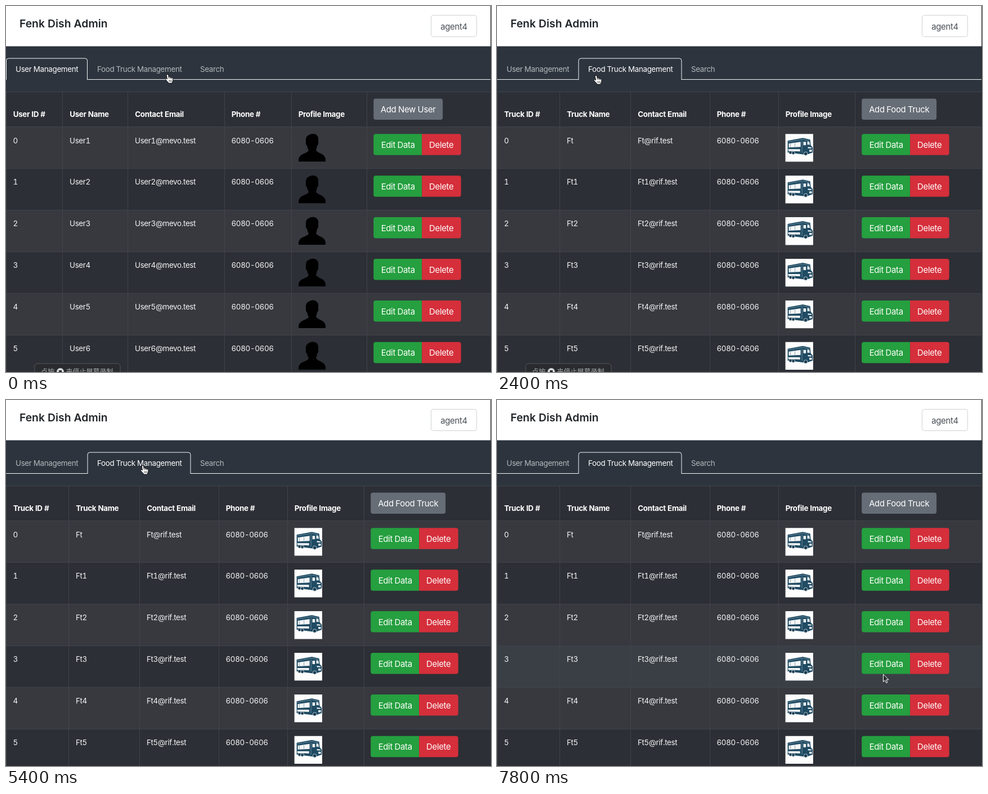
Animation of 862x650 px, one loop 8 s. Source, as an HTML page:

```html
<!DOCTYPE html>
<html lang="en">
<head>
<meta charset="utf-8">
<title>Admin tables</title>
<style>
  html, body { margin: 0; width: 100%; height: 100%; overflow: hidden; background: #2d343e; }
  svg { display: block; width: 100vw; height: 100vh; }
  text {
    font: 400 13.4px Inter, "Open Sans", sans-serif;
    font-variant-numeric: tabular-nums;
    letter-spacing: -.025em;
    fill: #f4f5f6;
  }
  .title { font-size: 19.3px; font-weight: 600; letter-spacing: 0; fill: #212529; }
  .head { font-weight: 700; fill: #fff; }
  .button { font-size: 15px; text-anchor: middle; fill: #fff; }
  .account { fill: #4a5056; }
  .toast { font: 12px "Noto Sans CJK SC", "Noto Sans CJK", sans-serif; letter-spacing: 0; fill: #a9abad; }
</style>
</head>
<body>
<svg id="stage" viewBox="0 0 862 650" preserveAspectRatio="none">
  <defs>
    <path id="person" d="M0 49V45Q1 38 9 35Q17 32 18 29Q16 26 15 21Q12 18 13 14Q12 4 18 2Q24-2 31 1Q36 4 35 13Q36 18 33 21Q32 26 31 29Q33 32 40 35Q47 38 48 45V49Z"/>
    <g id="truck">
      <path fill="#fdfdfd" d="M0 0H49.3V49.3H0Z"/>
      <path fill="#1f4b63" d="M4 12L31 7L44 10L45 20L48.5 24V33L37 37L4 33Z"/>
      <path fill="#f4f7f8" d="M6 17L27 14V23L6 24ZM5 27H26V31L5 30ZM32 14H36.5V20H32ZM39 13L42.5 14L43.5 19H39ZM40 23L46.5 24V25.5H40ZM42.5 28H47V31.5H42.5Z"/>
      <path fill="none" stroke="#7f9baa" stroke-width=".8" d="M5 14L31 9.5L43 12M29.5 12V33M9 17V23.5M17 16V23"/>
      <g fill="#163a50" stroke="#e6edf0" stroke-width=".8">
        <circle cx="9" cy="33" r="2.8"/><circle cx="14" cy="33.6" r="2.8"/><circle cx="36" cy="35" r="3.2"/>
      </g>
    </g>
  </defs>

  <path fill="#2d343e" d="M0 0H862V650H0Z"/>
  <path fill="#fff" d="M0 0H861V71.5H0Z"/>
  <text class="title" x="24" y="38">Fenk Dish Admin</text>
  <rect x="755.5" y="16.5" width="81" height="38" rx="4" fill="#fff" stroke="#cfd2d6"/>
  <text class="button account" x="796" y="41.5">agent4</text>

  <g id="tabs"></g>
  <g id="views"></g>

  <g id="toast">
    <rect x="51" y="635" width="152" height="40" rx="5" fill="#292b2f" stroke="#54575c"/>
    <text class="toast" x="62" y="654">点按</text>
    <circle cx="96.5" cy="649.5" r="6.5" fill="#d6d7d8"/>
    <path fill="#292b2f" d="M94 647H99V652H94Z"/>
    <text class="toast" x="106.5" y="654">来停止屏幕录制</text>
  </g>

  <g id="cursor" stroke="#111" stroke-linejoin="round">
    <g id="hand">
      <path fill="#fff" d="M-1.6 1.2Q-1.6-.7 0-.7Q1.5-.7 1.7 1.2L2.3 5Q4-.1 4.8 5Q6.5 4 7.2 5.9Q9.6 4.8 9.9 7.8Q10.2 11 8.4 13.3V15H1.2V13.5Q-1 11.5-3.3 8.6Q-4.2 6.9-2.8 6.5Q-1.8 6.3-.5 8Z"/>
      <path fill="none" stroke-width=".8" d="M2.4 4.5V7M4.8 5V7.2M7.2 5.9V7.6M3 9.5V12.5M5 9.5V12.5M7 9.5V12.5"/>
    </g>
    <path id="arrow" fill="#2a2d31" stroke="#fff" d="M.5.5V14L3.6 11.2L5.8 16L8 15L5.9 10.3H10Z"/>
  </g>
  <path fill="#2b2e33" d="M861 0H862V650H861Z"/>
</svg>

<script>
const LOOP = 8000, STEP = 200;
const ROWS = 6, ROW_TOP = 215, ROW_HEIGHT = 73.9;
const DARK = '#2c2f35', STRIPE = '#37393f', HOVER = '#3a3f45', LINE = '#40444b';
const $ = id => document.getElementById(id);

function add(parent, tag, attrs, content) {
  const node = document.createElementNS('http://www.w3.org/2000/svg', tag);
  for (const name in attrs) node.setAttribute(name, attrs[name]);
  if (content !== undefined) node.textContent = content;
  parent.appendChild(node);
  return node;
}
const show = (node, on) => node.setAttribute('display', on ? 'inline' : 'none');
const label = (parent, x, y, content, kind = '') =>
  add(parent, 'text', { x, y, class: kind }, content);
const path = (parent, d, fill, stroke = 'none') => add(parent, 'path', { d, fill, stroke });

// Tabs
const tabs = [
  { name: 'User Management', left: .5, right: 144.5, textX: 17 },
  { name: 'Food Truck Management', left: 145, right: 328, textX: 162 },
  { name: 'Search', left: 329, right: 404, textX: 345 }
];
path($('tabs'), 'M0 130.5H861', 'none', '#f5f6f7');
for (const tab of tabs) {
  const { left, right } = tab;
  const outline = `M${left} 131V97Q${left} 93 ${left + 4} 93H${right - 4}Q${right} 93 ${right} 97V131`;
  tab.gap = path($('tabs'), `M${left} 129H${right}V132H${left}Z`, '#2d343e');
  tab.border = path($('tabs'), outline, 'none', '#f5f6f7');
  tab.text = label($('tabs'), tab.textX, 117, tab.name);
}

// Tables
function makeView({ edges, heads, addLabel, addWidth, cells, image, imageX }) {
  const group = add($('views'), 'g', {});
  const actionX = edges[5] + 12.2;
  const rowY = i => ROW_TOP + i * ROW_HEIGHT;
  add(group, 'rect', { x: 0, y: 152, width: 861, height: 498, fill: DARK });
  const rows = Array.from({ length: ROWS }, (_, i) => add(group, 'rect', {
    x: 0, y: rowY(i), width: 861, height: ROW_HEIGHT
  }));
  let grid = 'M0 152.5H861M0 214.5H861';
  for (let i = 1; i < ROWS; i++) grid += `M0 ${Math.round(rowY(i)) - .5}H861`;
  for (const x of edges) grid += `M${Math.floor(x) + .5} 152V650`;
  path(group, grid, 'none', LINE);

  heads.forEach((head, i) => label(group, edges[i] + 12.7, 197, head, 'head'));
  add(group, 'rect', { x: actionX, y: 164.5, width: addWidth, height: 37.5, rx: 4, fill: '#666d76' });
  label(group, actionX + addWidth / 2, 189.3, addLabel, 'button');

  for (let i = 0; i < ROWS; i++) {
    const y = rowY(i);
    cells(i).forEach((cell, col) => label(group, edges[col] + 12.5, y + 28.5, cell));
    add(group, 'use', { href: image, x: imageX, y: y + 12.3 });
    const buttons = add(group, 'g', { transform: `translate(${actionX} ${y + 12.3})` });
    path(buttons, 'M4 0H86V37.5H4Q0 37.5 0 33.5V4Q0 0 4 0Z', '#259f3f');
    path(buttons, 'M86 0H151.5Q155.5 0 155.5 4V33.5Q155.5 37.5 151.5 37.5H86Z', '#d52f3b');
    label(buttons, 43.5, 24.7, 'Edit Data', 'button');
    label(buttons, 120.5, 24.7, 'Delete', 'button');
  }
  return { group, rows };
}

const phone = '6080-0606';
const shared = ['Contact Email', 'Phone #', 'Profile Image'];
const views = [
  makeView({
    edges: [0, 100.5, 216.5, 388, 507, 641],
    heads: ['User ID #', 'User Name', ...shared],
    addLabel: 'Add New User', addWidth: 123,
    cells: i => [i, `User${i + 1}`, `User${i + 1}@mevo.test`, phone],
    image: '#person', imageX: 520
  }),
  makeView({
    edges: [0, 111.5, 237.5, 378, 500, 636],
    heads: ['Truck ID #', 'Truck Name', ...shared],
    addLabel: 'Add Food Truck', addWidth: 133,
    cells: i => [i, `Ft${i || ''}`, `Ft${i || ''}@rif.test`, phone],
    image: '#truck', imageX: 512.6
  })
];

// Pointer path: time, x, y
const pointerKeys = [
  [0, 287, 122], [800, 251, 118], [1400, 250, 117], [2400, 176, 124],
  [3000, 93, 119], [3800, 90, 119], [4600, 233, 115], [5200, 243, 117],
  [5800, 243, 117], [6400, 310, 160], [7400, 678, 470], [7800, 686, 486.5]
];
const toastKeys = [[0, 1], [3400, 1], [3800, .9], [4600, .45], [5200, 0]];

function sample(keys, time, ease = k => k) {
  const next = keys.findIndex(key => key[0] > time);
  if (next < 0) return keys[keys.length - 1].slice(1);
  const a = keys[next - 1], b = keys[next];
  const k = ease((time - a[0]) / (b[0] - a[0]));
  return a.slice(1).map((value, i) => value + (b[i + 1] - value) * k);
}
const smooth = k => k * k * (3 - 2 * k);

function render(time) {
  const [x, y] = sample(pointerKeys, time, smooth);
  const active = time < 1000 || (time >= 3200 && time < 5200) ? 0 : 1;
  const overTab = tabs.findIndex(tab => y > 93 && y < 131 && x >= tab.left && x <= tab.right);

  tabs.forEach((tab, i) => {
    show(tab.gap, i === active);
    show(tab.border, i === active || (i === overTab && time > 0));
    tab.text.style.fill = i === active ? '#fff' : '#b5b8bc';
  });

  const overRow = Math.floor((y - ROW_TOP) / ROW_HEIGHT);
  views.forEach((view, i) => {
    show(view.group, i === active);
    view.rows.forEach((row, n) =>
      row.setAttribute('fill', n === overRow ? HOVER : n % 2 ? DARK : STRIPE));
  });

  $('toast').setAttribute('opacity', sample(toastKeys, time)[0]);
  $('cursor').setAttribute('transform', `translate(${x} ${y})`);
  show($('hand'), overTab >= 0);
  show($('arrow'), overTab < 0);
}

const start = performance.now();
function tick() {
  const elapsed = (performance.now() - start) % LOOP;
  render(Math.floor(elapsed / STEP) * STEP);
  requestAnimationFrame(tick);
}
tick();
</script>
</body>
</html>
```
